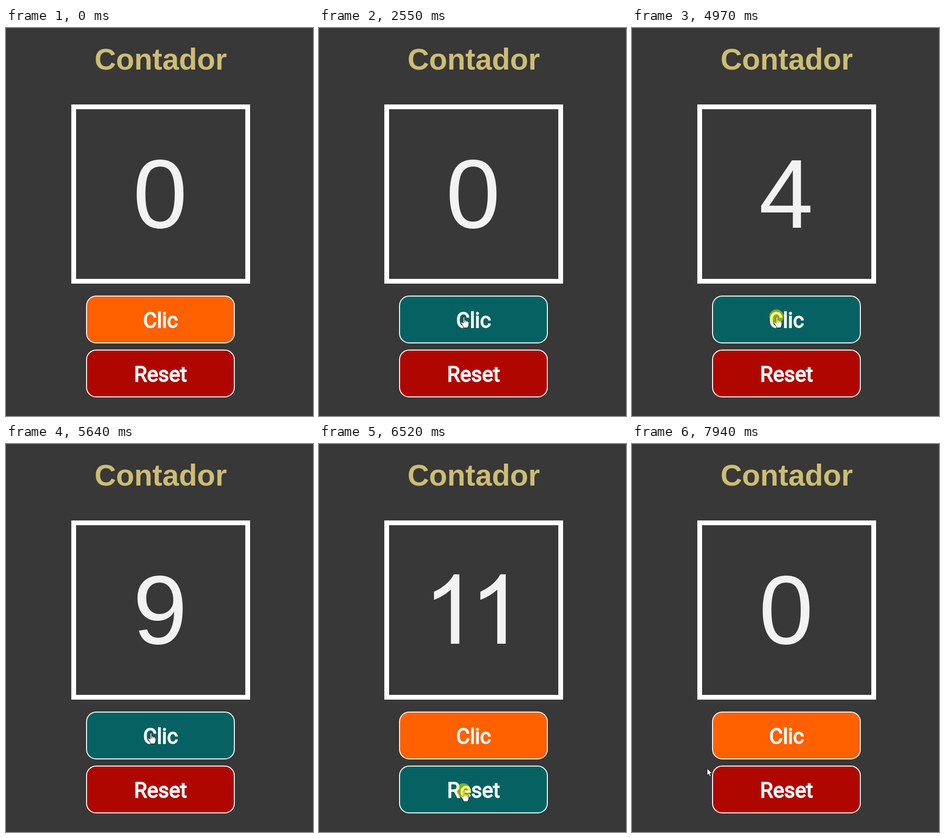
Recreate the animation shown at these times as an HTML page. Size 644 px wide and 812 px high, loop 8 s.

```html
<!DOCTYPE html>
<html lang="es">
<head>
<meta charset="utf-8">
<title>Contador</title>
<style>
  html, body { margin: 0; width: 100%; height: 100%; overflow: hidden; background: #383838; }
  svg { display: block; width: 644px; height: 812px; }
  text { text-anchor: middle; }
  .title { font: bold 62.5px 'Liberation Sans', Arial, sans-serif; fill: #cdbd74; }
  .digit { font: 205px 'Liberation Sans', Arial, sans-serif; }
  .btn rect { stroke: #fff; stroke-width: 2; }
  .btn text { font: 44px Roboto, sans-serif; fill: #fff; stroke: #fff; stroke-width: 1.8; }
  .cursor path { fill: #fff; stroke: #000; stroke-width: 1; stroke-linejoin: round; }
  .cursor .line { fill: none; }
  .cursor .beam { fill: none; stroke: #e8e8e8; }
</style>
</head>
<body>
<svg viewBox="0 0 644 812">
  <rect width="644" height="812" fill="#383838"/>
  <text class="title" x="324.5" y="87">Contador</text>
  <rect x="142" y="165" width="365" height="365" fill="none" stroke="#fff" stroke-width="10"/>
  <g id="count" fill="#f2f2f2"></g>
  <g class="btn">
    <rect id="clic" x="169" y="561" width="310" height="98" rx="20"/>
    <text x="324.3" y="626.5">Clic</text>
  </g>
  <g class="btn">
    <rect id="reset" x="169" y="674" width="310" height="98" rx="20"/>
    <text x="324.3" y="739.5">Reset</text>
  </g>
  <g id="cursor" class="cursor">
    <path id="arrow" d="M.5 .5V16L4 12.8L6.4 18.3L8.9 17.2L6.6 11.8H11.3Z"/>
    <path id="beam" class="beam" d="M-3 -7.5H4M.5 -7.5V7.5M-3 7.5H4"/>
    <g id="hand">
      <path d="M-1.5 2Q-1.5 .5 0 .5T1.5 2V8Q2 7 3.3 7.2T5 9Q5.5 8 6.8 8.2T8.3 10Q10.3 9 10.3 11.5V17Q10 20 8.5 21V23.5H-1V21.5Q-3 18 -5.5 14.5T-5 11.5T-1.5 13.5Z"/>
      <path class="line" d="M1.5 8V12M5 9V12M8.3 10V12.5"/>
    </g>
    <circle id="press" cx="-1" r="15" fill="#fff200" fill-opacity=".5"/>
  </g>
</svg>
<script>
const LOOP = 8000, TICK = 70;
const ADVANCE = 112.3, KERN = 15, BASE = 418, CENTER = 324;
const TEAL = '#066262', ORANGE = '#ff6000', RED = '#b00600';
const $ = id => document.getElementById(id);

// A numeral one without a foot, in 2048 units per em
const ONE = 'M763 0H583V1147Q420 1005 223 930V1104Q530 1245 647 1472H763Z';

// The pointer glides from one stop to the next along a bent path
const stops = {
  start: [650, 790], side: [609, 518], title: [189, 87], clic: [304, 604],
  reset: [304, 725], edge: [225, 628], out: [157, 678]
};
const glide = (begin, end, from, to, bend = [0, 0]) => {
  const a = stops[from], b = stops[to];
  return { begin, end, a, b, c: a.map((v, i) => (v + b[i]) / 2 + bend[i]) };
};
const glides = [
  glide(800, 1010, 'start', 'side', [-40, -10]),
  glide(1280, 2060, 'side', 'title', [20, -320]),
  glide(2130, 2550, 'title', 'clic', [-20, 0]),
  glide(6050, 6320, 'clic', 'reset'),
  glide(7050, 7460, 'reset', 'edge'),
  glide(7660, 7940, 'edge', 'out')
];

const press = (down, hold = TICK) => ({ down, up: down + hold });
const burst = (down, n, gap) => Array.from({ length: n }, (_, i) => press(down + i * gap, 65));
const clicks = [
  press(3210), press(3810, 130), press(4220, 60), press(4700),
  ...burst(4970, 3, 135), ...burst(5510, 2, 62), ...burst(5710, 2, 130)
];
const wipe = press(6520, 200);

// Glides advance in even steps, like a screen capture
function pointerAt(t) {
  const g = glides.findLast(g => t >= g.begin);
  if (!g) return null;
  const last = Math.round((g.end - g.begin) / TICK);
  const k = Math.floor((t - g.begin) / (g.end - g.begin) * last + 0.05);
  const s = Math.min(1, (k + 1) / (last + 1)), r = 1 - s;
  return g.a.map((v, i) => Math.round(r * r * v + 2 * r * s * g.c[i] + s * s * g.b[i]));
}

function glyph(d, x) {
  return d === '1'
    ? `<path transform="translate(${x} ${BASE}) scale(.0986 -.0986)" d="${ONE}"/>`
    : `<text class="digit" x="${x + ADVANCE / 2 - 0.8}" y="${BASE}">${d}</text>`;
}

let shown = null;
function showCount(n) {
  if (n === shown) return;
  shown = n;
  const digits = [...String(n)];
  const step = ADVANCE - (n === 11 ? KERN : 0);
  const left = CENTER - (step * (digits.length - 1) + ADVANCE) / 2;
  $('count').innerHTML = digits.map((d, i) => glyph(d, left + i * step)).join('');
}

const show = (id, on) => $(id).setAttribute('visibility', on ? 'visible' : 'hidden');
const inside = (p, x, y, w, h) => !!p && p[0] >= x && p[0] <= x + w && p[1] >= y && p[1] <= y + h;

function draw(t) {
  const p = pointerAt(t);
  const onClic = inside(p, 168, 560, 312, 100);
  const onReset = inside(p, 168, 673, 312, 100);
  const onTitle = inside(p, 184, 40, 281, 60);
  const onButton = onClic || onReset;

  $('clic').setAttribute('fill', onClic ? TEAL : ORANGE);
  $('reset').setAttribute('fill', onReset ? TEAL : RED);
  showCount(t >= wipe.up ? 0 : clicks.filter(c => t >= c.up).length);

  if (p) $('cursor').setAttribute('transform', `translate(${p})`);
  show('arrow', p && !onButton && !onTitle);
  show('beam', onTitle);
  show('hand', onButton);
  show('press', [...clicks, wipe].some(c => t >= c.down && t < c.up));
}

const start = performance.now();
function tick() {
  draw((performance.now() - start) % LOOP);
  requestAnimationFrame(tick);
}
draw(0);
requestAnimationFrame(tick);
</script>
</body>
</html>
```
